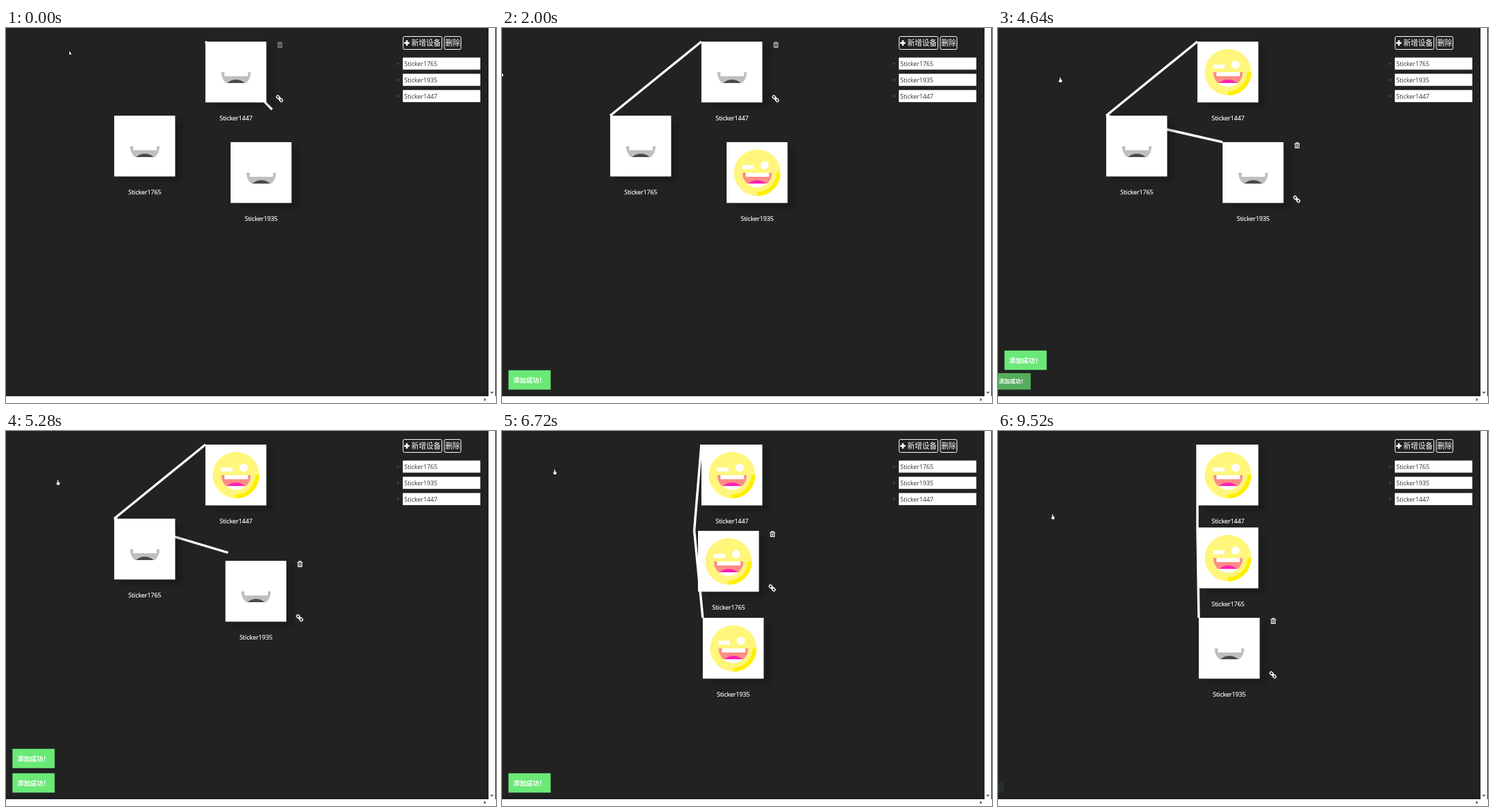
An HTML page that plays this animation: 720x552 px, repeating every 9680 ms.

```html
<!DOCTYPE html>
<html lang="zh">
<head>
<meta charset="utf-8">
<title>Stickers</title>
<style>
html, body { margin: 0; width: 100%; height: 100%; overflow: hidden; background: #222; }
svg { display: block; width: 720px; height: 552px; }
text { font-family: "Open Sans", "Noto Sans", sans-serif; font-size: 9px; fill: #fff; }
.cjk { font-family: "Noto Sans CJK SC", "Noto Sans CJK", sans-serif; font-size: 10.8px; font-weight: 500; }
.toast text { font-size: 9.5px; font-weight: 700; }
.label { text-anchor: middle; font-weight: 500; stroke: #fff; stroke-width: .2; }
.items text { fill: #333; }
.link { stroke: #fff; stroke-width: 3.5; }
.face { --skin: #fff67b; --shade: #fff000; --mouth: #ff8c85; --tongue: #ff1fb4; }
.face.gray { --skin: #fff; --shade: #fff; --mouth: #bfbfbf; --tongue: #4a4a4a; }
.skin { fill: var(--skin); }
.shade { fill: none; stroke: var(--shade); stroke-width: 6; }
.mouth { fill: var(--mouth); }
.tongue { fill: var(--tongue); }
</style>
</head>
<body>
<svg viewBox="0 0 720 552" xmlns="http://www.w3.org/2000/svg">
  <defs>
    <filter id="shadow" x="-30%" y="-30%" width="180%" height="180%">
      <feDropShadow dx="11" dy="8" stdDeviation="5" flood-color="#000" flood-opacity=".2"/>
    </filter>
    <clipPath id="grin"><path d="M23.3 45h43.4A21.7 21.7 0 0 1 59.7 61H30.3A21.7 21.7 0 0 1 23.3 45z"/></clipPath>
    <g id="faceShape">
      <circle class="skin" cx="45" cy="45" r="34.2"/>
      <path class="shade" d="M76.2 45A31.2 31.2 0 0 1 45 76.2"/>
      <rect x="23" y="33.7" width="17" height="6" fill="#fff"/>
      <circle cx="56" cy="34" r="6" fill="#fff"/>
      <path d="M23.3 45h43.4a21.7 21.7 0 0 1-43.4 0z" fill="#fff"/>
      <g clip-path="url(#grin)">
        <rect class="mouth" x="20" y="45" width="50" height="16"/>
        <circle class="tongue" cx="45" cy="75.7" r="19.6"/>
        <rect x="28" y="44" width="34.5" height="7" fill="#fff"/>
      </g>
    </g>
    <g id="trash" fill="none" stroke="#fff">
      <path d="M-4-2.8h8M-1.3-3v-1.2h2.6V-3M-2.8-2.5v6h5.6v-6" stroke-width="1.1"/>
      <path d="M-1.1-1.5v4.3M0-1.5v4.3M1.1-1.5v4.3" stroke-width=".6"/>
    </g>
    <g id="chain" fill="none" stroke="#fff" stroke-width="1.4" transform="rotate(45)">
      <rect x="-5.6" y="-1.9" width="5.2" height="3.8" rx="1.7"/>
      <rect x=".4" y="-1.9" width="5.2" height="3.8" rx="1.7"/>
      <path d="M-2 0h4"/>
    </g>
  </defs>

  <rect width="720" height="552" fill="#222"/>
  <rect y="538" width="709" height="4" fill="#1f1f1f"/>

  <g fill="none" stroke="#fff">
    <rect x="583.5" y="12.5" width="57" height="19" rx="2"/>
    <rect x="644" y="12.5" width="24.5" height="19" rx="2"/>
    <path d="M585 22h8M589 18v8" stroke-width="2.6"/>
  </g>
  <text class="cjk" x="595.7" y="26.3">新增设备</text>
  <text class="cjk" x="645.6" y="26.3">删除</text>
  <g class="items" id="items"></g>

  <g id="links"></g>
  <g id="cards"></g>
  <g id="toasts"></g>

  <path d="M709 0h10v542h1v10H0V542h709z" fill="#fff"/>
  <path d="M711.5 535.5h5l-2.5 3zM702.5 544.5v5l3-2.5z" fill="#555"/>
  <path id="arrow" d="M0 0v5.2l1.2-1 .8 1.6 .8-.4-.7-1.5H3.4z" fill="#fff"/>
  <path id="hand" d="M-.4 0Q.4-.5 1 .2V2.6L3 3.2V5.4L2.3 7H-.4L-2 4.4l.6-.7 1 .8z" fill="#fff"/>
</svg>

<script>
const NS = "http://www.w3.org/2000/svg";
const LOOP = 9680, STEP = 80;
const FIRST_LINK = 1760, SECOND_LINK = 4520, TOAST_LIFE = 4800;
const $ = id => document.getElementById(id);

function add(parent, tag, attrs = {}, text = "") {
  const el = document.createElementNS(NS, tag);
  for (const key in attrs) el.setAttribute(key, attrs[key]);
  el.textContent = text;
  parent.append(el);
  return el;
}
const show = (el, on) => el.setAttribute("visibility", on ? "visible" : "hidden");
const move = (el, [x, y]) => el.setAttribute("transform", `translate(${x} ${y})`);
const progress = (t, from, to) => Math.min(1, Math.max(0, (t - from) / (to - from)));
const smooth = p => p * p * (3 - 2 * p);

// Eased moves, each [from, to, x, y], with rests between them.
function glide([x, y], moves, t) {
  for (const [from, to, nextX, nextY] of moves) {
    const p = smooth(progress(t, from, to));
    x += (nextX - x) * p;
    y += (nextY - y) * p;
  }
  return [x, y];
}

const cards = {
  1447: { home: [293, 20], moves: [], toggles: [480, FIRST_LINK, 4560] },
  1765: {
    home: [159, 129],
    moves: [[5920, 6080, 159.5, 136], [6080, 6720, 288, 147], [6720, 7040, 293, 142]],
    toggles: [6400]
  },
  1935: { home: [330, 168], moves: [[5040, 5840, 295, 275]], toggles: [480, 4320, 6400, 8240] }
};
const place = (id, t) => glide(cards[id].home, cards[id].moves, t);

// Pointer moves, each followed by the card it hovers.
const pointerHome = [93, 34];
const pointerMoves = [
  [0, 400, 74, 46, 1447], [400, 960, 27, 71, 1935], [960, 1280, -5, 66, 0],
  [1920, 2560, 80, 32, 1447], [2560, 2880, 36, 73, 1765],
  [3280, 4240, 91, 73, 1765], [4240, 4640, 91, 73, 1935], [5040, 5920, 8, 70, 1935],
  [5920, 6080, 25, 66, 1765], [6080, 6720, 77, 57, 1765],
  [7760, 7920, 77, 26, 1447], [8080, 8240, 77, 57, 1765], [8560, 9520, 80, 123, 1935]
];

const drags = [
  { from: 1447, to: 1765, start: 0, end: FIRST_LINK,
    home: [391, 120], moves: [[0, 960, 284, 216], [960, 1280, 205, 190]] },
  { from: 1765, to: 1935, start: 3280, end: SECOND_LINK,
    home: [269, 210.5], moves: [[3280, 4240, 375, 214]] }
];

["1765", "1935", "1447"].forEach((id, i) => {
  const y = 43.5 + 23.9 * i;
  add($("items"), "circle", { cx: 576, cy: y + 9, r: 1.8, fill: "#444" });
  add($("items"), "rect", { x: 583, y, width: 114, height: 17.8, fill: "#fff" });
  add($("items"), "text", { x: 585.3, y: y + 12.6 }, "Sticker" + id);
});

for (const id in cards) {
  const card = cards[id];
  card.el = add($("cards"), "g");
  add(card.el, "rect", { width: 89.5, height: 89.5, fill: "#fff", filter: "url(#shadow)" });
  card.face = add(card.el, "g", { class: "face" });
  add(card.face, "use", { href: "#faceShape" });
  add(card.el, "text", { class: "label", x: 45, y: 116 }, "Sticker" + id);
  card.trash = add(card.el, "use", { href: "#trash", x: 109.5, y: 5 });
  card.chain = add(card.el, "use", { href: "#chain", x: 109, y: 84 });
}
for (const drag of drags) drag.el = add($("links"), "line", { class: "link" });

const toasts = [0, 1].map(() => {
  const el = add($("toasts"), "g", { class: "toast" });
  const box = add(el, "rect", { x: -31, y: -28.5, width: 62, height: 28.5, fill: "#6ae977" });
  const text = add(el, "text", { class: "cjk", x: -24, y: -10.6 }, "添加成功！");
  return { el, box, text };
});

function drawCards(t) {
  const index = pointerMoves.findLastIndex(m => t >= m[0]);
  const [start, , , , hovered] = pointerMoves[index];
  const previous = index ? pointerMoves[index - 1][4] : 0;
  const fadeIn = hovered === previous ? 1 : 0.5 + progress(t, start, start + 160) / 2;
  const fadeOut = t < start + STEP ? 0.45 : 0;

  for (const id in cards) {
    const card = cards[id], active = +id === hovered;
    const leaving = +id === previous ? fadeOut : 0;
    const flips = card.toggles.filter(time => t >= time).length;
    move(card.el, place(id, t));
    card.face.setAttribute("class", flips % 2 ? "face" : "face gray");
    card.trash.setAttribute("opacity", active ? fadeIn : leaving);
    card.chain.setAttribute("opacity", active ? 1 : leaving);
  }
}

// Joined lines trail the cards by one step.
function drawLinks(t) {
  for (const { el, from, to, start, end, home, moves } of drags) {
    show(el, t >= start);
    const [x1, y1] = place(from, t - STEP);
    const [x2, y2] = t < end ? glide(home, moves, t) : place(to, t - STEP);
    for (const [key, value] of Object.entries({ x1, y1, x2, y2 })) el.setAttribute(key, value);
  }
}

// away: 0 is at rest, 1 is fully slid out.
function placeToast({ el, box, text }, bottom, away) {
  const x = 40.5 - 51 * away ** 0.82;
  el.setAttribute("transform", `translate(${x} ${bottom}) scale(${1 - away / 2})`);
  box.setAttribute("opacity", 1 - away);
  text.setAttribute("opacity", 1 - away ** 3);
}

function drawToasts(t) {
  const enter = (1 - progress(t, SECOND_LINK, SECOND_LINK + 360)) ** 3;
  const leave = progress(t, SECOND_LINK + TOAST_LIFE, SECOND_LINK + TOAST_LIFE + 213);
  show(toasts[0].el, t >= FIRST_LINK && t < FIRST_LINK + TOAST_LIFE);
  placeToast(toasts[0], 532.3 - 36 * (1 - enter ** 1.35), 0);
  show(toasts[1].el, t >= SECOND_LINK);
  placeToast(toasts[1], 532.3, Math.max(enter, leave));
}

function draw(time) {
  const t = Math.floor((time % LOOP) / STEP) * STEP;
  drawCards(t);
  drawLinks(t);
  drawToasts(t);
  const tip = glide(pointerHome, pointerMoves, t);
  move($("arrow"), tip);
  move($("hand"), tip);
  show($("arrow"), t < FIRST_LINK);
  show($("hand"), t >= FIRST_LINK);
}

const begin = performance.now();
function tick() {
  draw(performance.now() - begin);
  requestAnimationFrame(tick);
}
draw(0);
requestAnimationFrame(tick);
</script>
</body>
</html>
```
